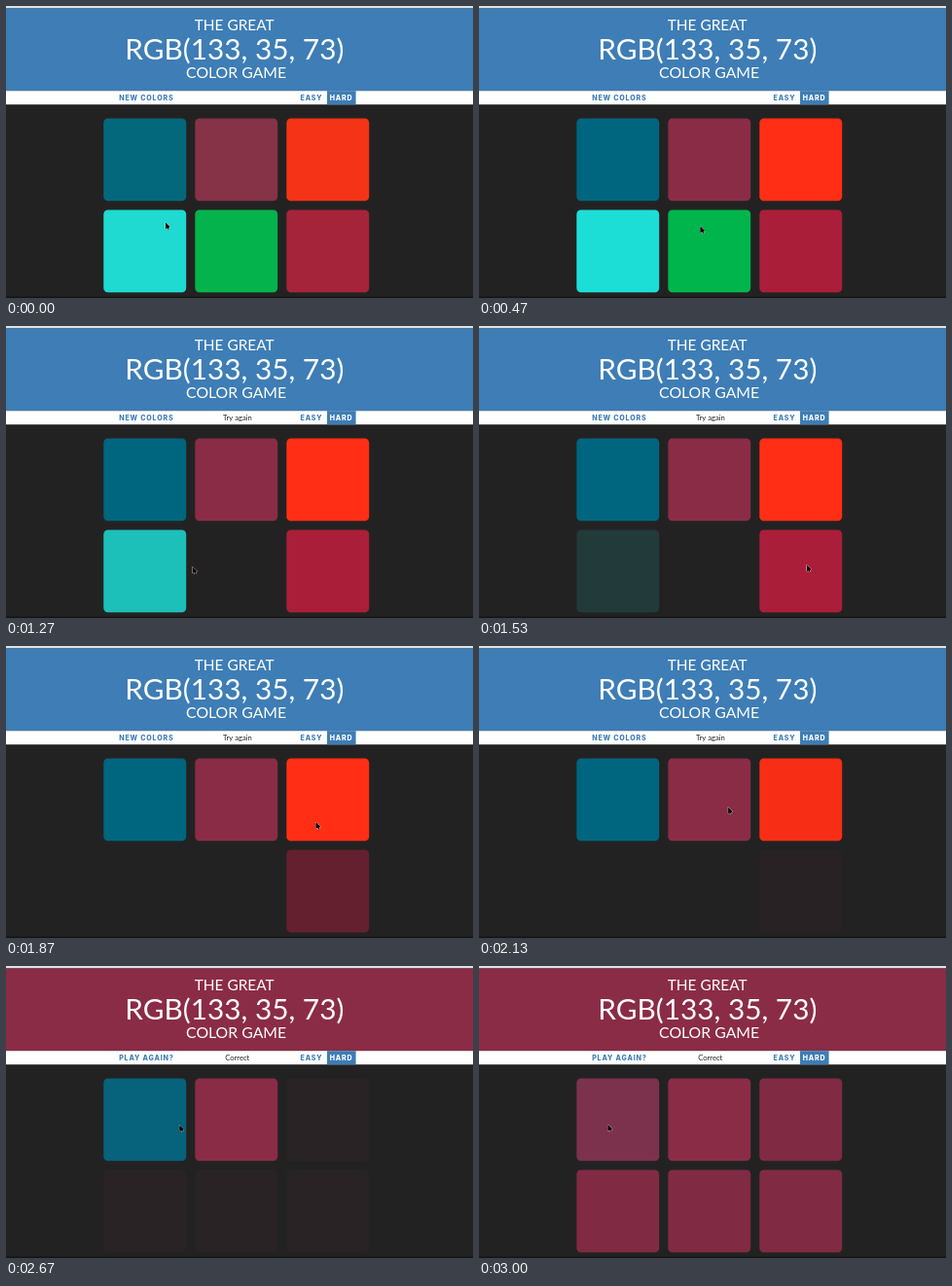
An HTML page with a canvas that plays this animation: 480 by 300 pixels, repeating every 3.07 s.

```html
<!DOCTYPE html>
<html lang="en">
<head>
<meta charset="utf-8">
<title>Color game</title>
<style>
  html, body { margin: 0; width: 100%; height: 100%; overflow: hidden; background: #232323; }
  canvas { display: block; width: 480px; height: 300px; }
</style>
</head>
<body>
<canvas id="stage" width="480" height="300"></canvas>
<script>
const ctx = document.getElementById('stage').getContext('2d');

const LOOP = 3070, STEP = 200 / 3, FADE = 600, GLIDE = 240;
const FIRST_MISS = 705, WIN = 2625;
const WHITE = [255, 255, 255], BLUE = [62, 125, 181], DARK = [35, 34, 35];
const MAROON = [138, 44, 70], LAST_ROUND = [70, 150, 80];
const TITLE = 'Lato, "Open Sans", sans-serif';
const LABEL = '800 7.1px Inter, "Liberation Sans", sans-serif';

// miss: time of a wrong click
const tiles = [
  { color: [0, 101, 126] },
  { color: MAROON },
  { color: [255, 46, 20], miss: 2100 },
  { color: [28, 222, 215], miss: 1183 },
  { color: [0, 181, 76], miss: FIRST_MISS },
  { color: [171, 30, 57], miss: 1685 }
];

// places where the pointer rests, and when it leaves them
const stops = [
  { x: 164, y: 222.5, leave: 0 },
  { x: 227.5, y: 226.5, leave: 690 },
  { x: 130.5, y: 248.5, leave: 1180 },
  { x: 337, y: 245.7, leave: 1680 },
  { x: 316, y: 172, leave: 1965 },
  { x: 240, y: 164, leave: 2535 },
  { x: 132.5, y: 163, leave: LOOP }
];

const clamp = v => Math.max(0, Math.min(1, v));
const lerp = (a, b, k) => a + (b - a) * k;
const mix = (a, b, k) => a.map((v, i) => lerp(v, b[i], k));
const css = c => `rgb(${c.map(Math.round).join(',')})`;
const smooth = u => u * u * (3 - 2 * u);
const bezier = (u, a, b) => 3 * u * (1 - u) ** 2 * a + 3 * u * u * (1 - u) * b + u ** 3;

// the CSS "ease" curve
function ease(x) {
  let lo = 0, hi = 1;
  for (let i = 0; i < 20; i++) {
    const mid = (lo + hi) / 2;
    if (bezier(mid, 0.25, 0.25) < x) lo = mid; else hi = mid;
  }
  return bezier(lo, 0.1, 1);
}

const fade = (from, to, age) => mix(from, to, ease(clamp(age / FADE)));

function rect(x, y, w, h, color) {
  ctx.fillStyle = css(color);
  ctx.fillRect(x, y, w, h);
}

function text(str, x, y, font, color, align = 'center', spacing = 0) {
  ctx.font = font;
  ctx.letterSpacing = spacing + 'px';
  ctx.textAlign = align;
  ctx.fillStyle = css(color);
  ctx.fillText(str, x, y);
}

function drawHeader(won) {
  rect(0, 0, 480, 2.4, [222, 227, 226]);
  rect(0, 2.4, 480, 84.8, won ? MAROON : BLUE);
  text('THE GREAT', 234.7, 25.3, '15.4px ' + TITLE, WHITE);
  text('RGB(133, 35, 73)', 234.8, 54.8, '29.8px ' + TITLE, WHITE);
  text('COLOR GAME', 236.6, 74.4, '15.8px ' + TITLE, WHITE);
}

function drawBar(won, missed) {
  const label = (str, x, color) => text(str, x, 97.4, LABEL, color, 'left', 0.8);
  rect(0, 87.2, 480, 14, WHITE);
  rect(330, 87.2, 29.6, 14, BLUE);
  label(won ? 'PLAY AGAIN?' : 'NEW COLORS', 116.2, BLUE);
  label('EASY', 302.6, BLUE);
  label('HARD', 332.7, WHITE);
  if (missed) text(won ? 'Correct' : 'Try again', 237.8, 96.9, '7.6px ' + TITLE, DARK);
}

function drawTiles(t) {
  tiles.forEach(({ color, miss = LOOP }, i) => {
    let c = fade(LAST_ROUND, color, t + 430);
    c = fade(c, DARK, t - miss);
    c = fade(c, MAROON, t - WIN);
    ctx.fillStyle = css(c);
    ctx.beginPath();
    ctx.roundRect(100.3 + (i % 3) * 94, 115.5 + Math.floor(i / 3) * 94, 84.9, 84.8, 4.5);
    ctx.fill();
  });
}

function drawCursor(t) {
  const n = stops.findIndex(s => s.leave > t);
  const from = stops[n - 1], to = stops[n];
  const k = smooth(clamp((t - from.leave) / GLIDE));
  const head = new Path2D('M0 0V6.2L4.5 4.5Z'), tail = new Path2D('M1.8 4.2L3.1 7');

  ctx.save();
  ctx.translate(lerp(from.x, to.x, k), lerp(from.y, to.y, k));
  ctx.lineJoin = 'round';
  ctx.strokeStyle = '#ddd';
  ctx.lineWidth = 1;
  ctx.stroke(head);
  ctx.lineWidth = 2.2;
  ctx.stroke(tail);
  ctx.fill(head);
  ctx.strokeStyle = ctx.fillStyle = '#000';
  ctx.fill(head);
  ctx.lineWidth = 1.2;
  ctx.stroke(tail);
  ctx.restore();
}

function draw(t) {
  const won = t >= WIN;
  rect(0, 0, 480, 300, DARK);
  rect(0, 298.5, 480, 1.5, [20, 20, 20]);
  drawHeader(won);
  drawBar(won, t >= FIRST_MISS);
  drawTiles(t);
  drawCursor(t);
}

// fifteen pictures a second
const snap = t => Math.min(Math.floor((t + 4) / STEP) * STEP, 3000);

const began = performance.now();
function loop() {
  draw(snap((performance.now() - began) % LOOP));
  requestAnimationFrame(loop);
}
loop();
</script>
</body>
</html>
```
